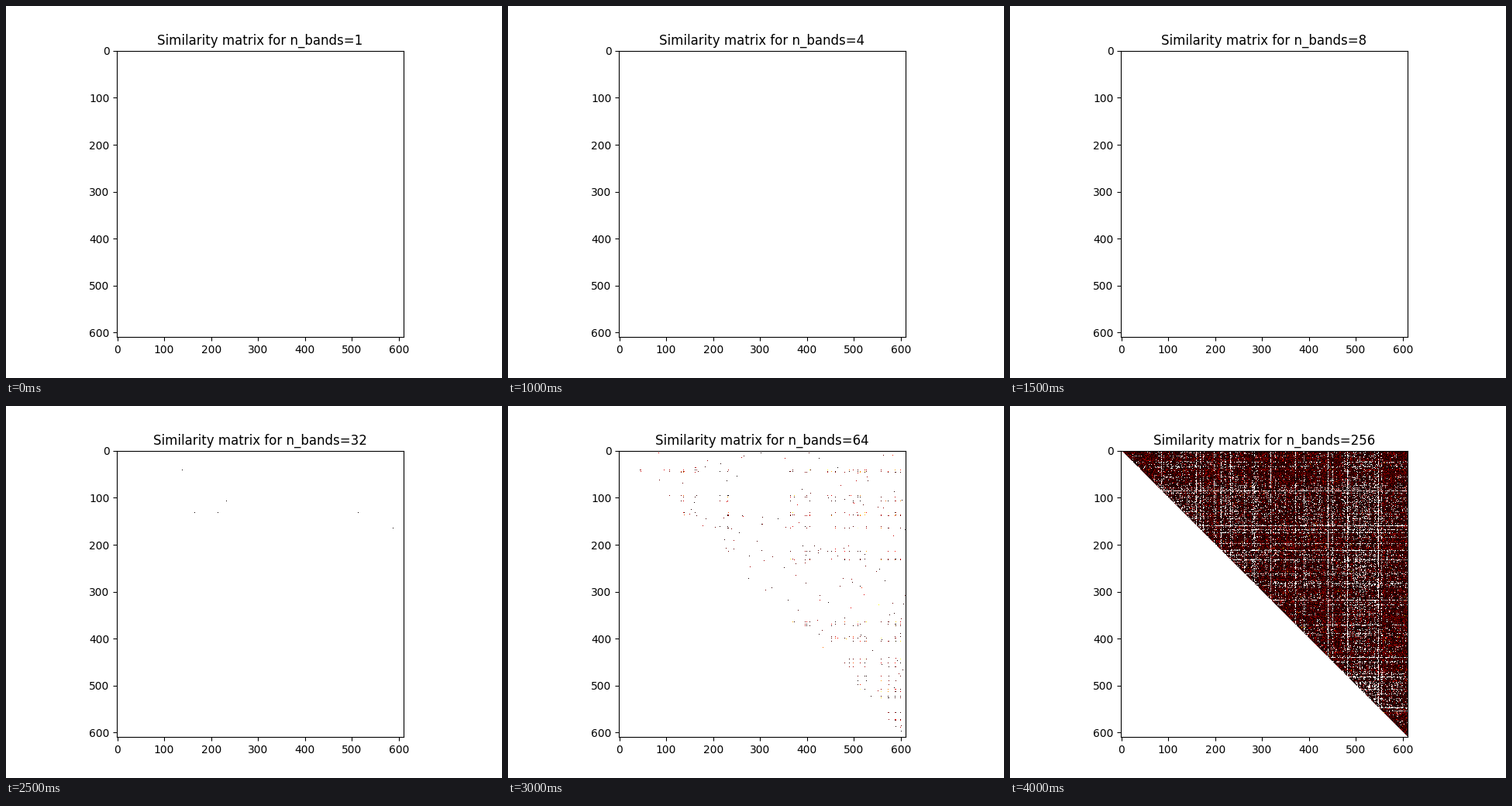
A matplotlib script that plays this animation: 640 px wide and 480 px high, repeating every 4500 ms.

```python
import numpy as np
import matplotlib.pyplot as plt
from matplotlib.animation import FuncAnimation

SIZE = 370          # drawn cells per side, one per screen pixel
ITEMS = 610         # items on each axis
BANDS = [2 ** k for k in range(9)]
rng = np.random.default_rng(7)
POS = np.arange(SIZE)


def hub_weights():
    """Small groups of items that share many bands."""
    w = np.zeros(SIZE)
    for centre in (27, 60, 84, 106, 141, 228, 243, 274, 294, 309, 319, 344, 358):
        for cell in rng.normal(centre, 4, 3).astype(int):
            w[min(cell, SIZE - 1)] = rng.uniform(0.4, 1.1)
    return w


def item_activity():
    trend = np.interp(POS, [0, 46, 54, 110, 280, 300, 330, 338],
                      [1.2, 1.2, 0.8, 1.05, 1.1, 0.8, 0.75, 1.25])
    act = trend * rng.lognormal(0, 0.42, SIZE)
    act[rng.random(SIZE) < 0.05] *= 0.25
    act[[52, 97, 267, 292, 332]] = 0.1
    return act


def levels(chance, mean):
    """Similarity above the diagonal, zero where a pair is not found."""
    found = np.triu(rng.random((SIZE, SIZE)) < chance, 1)
    return found * (0.001 + rng.exponential(1, (SIZE, SIZE)) * mean)


def closest(sim, count):
    part = np.zeros_like(sim)
    window = np.s_[25:194, 78:357]
    limit = np.sort(sim[window], axis=None)[-count]
    part[window] = (sim[window] >= limit) * 0.001
    return part


def make_matrices():
    w, act = hub_weights(), item_activity()
    shared = np.outer(w, w)
    rate = np.outer(act, act)
    hubs = levels(1 - np.exp(-1.5 * shared), 0.08 + 0.26 * shared)
    stray = levels(0.0022, 0.14)
    few = np.maximum(hubs, stray)
    half = np.maximum(levels(1 - np.exp(-0.42 * rate), 0.13), 0.8 * few)
    full = np.maximum(levels(1 - np.exp(-2.7 * rate), 0.055 * np.sqrt(rate)),
                      0.5 * half)
    return [np.zeros_like(few)] * 5 + [closest(hubs, 6), few, half, full]


matrices = [np.ma.masked_equal(m, 0) for m in make_matrices()]

fig, ax = plt.subplots(figsize=(6.4, 4.8), dpi=100)
image = ax.imshow(matrices[0], cmap="hot", vmin=0, vmax=1,
                  interpolation="nearest",
                  extent=(-0.5, ITEMS - 0.5, ITEMS - 0.5, -0.5))
title = ax.set_title("")


def update(i):
    image.set_data(matrices[i])
    title.set_text(f"Similarity matrix for n_bands={BANDS[i]}")
    return image, title


anim = FuncAnimation(fig, update, frames=len(BANDS), interval=500,
                     repeat=True, repeat_delay=0)
plt.show()
```
